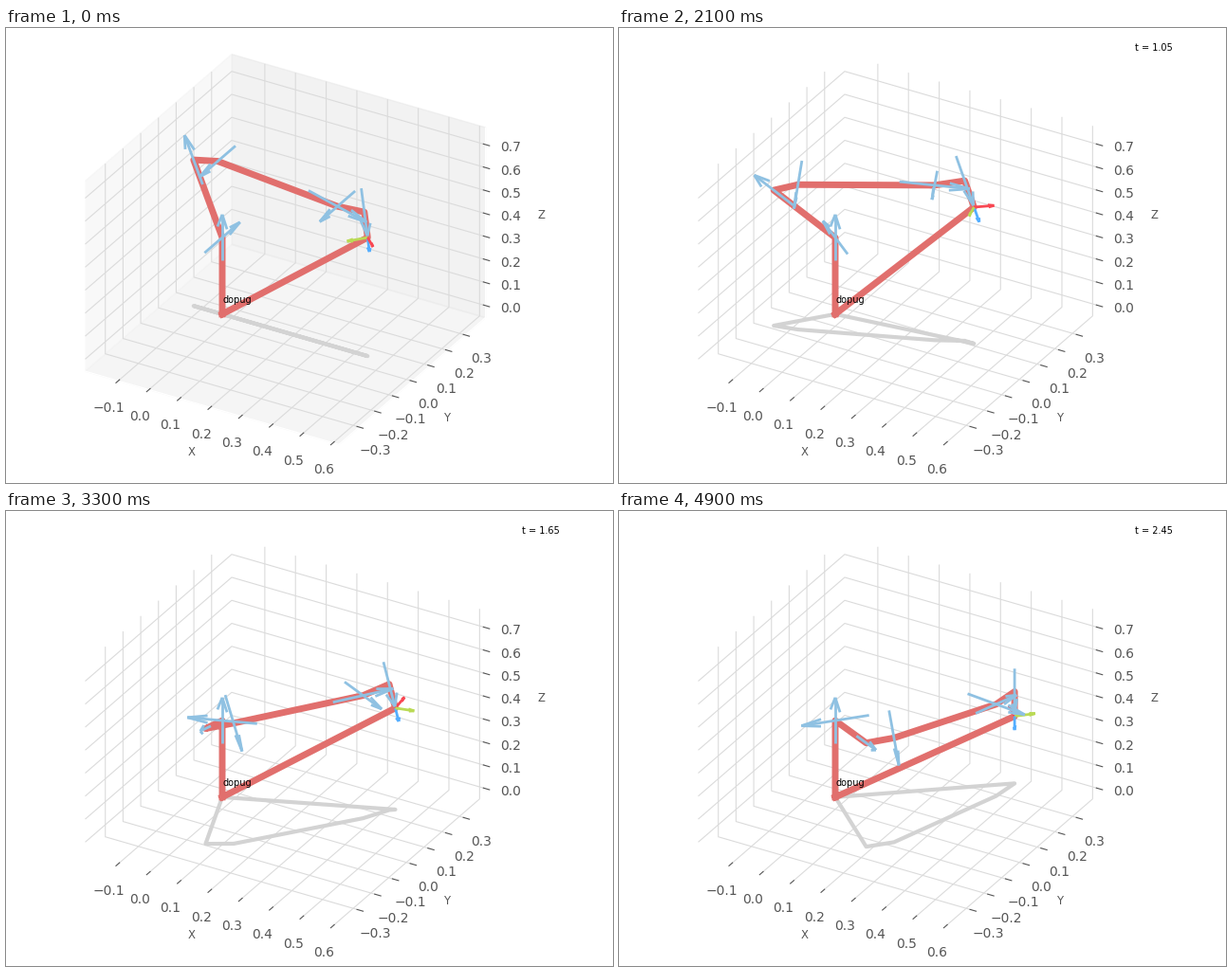
These frames come from a looping animation (640x480 px, 5 s). A matplotlib script:

```python
import numpy as np
import matplotlib.pyplot as plt
from matplotlib.animation import FuncAnimation

FRAMES, INTERVAL, STEP = 50, 100, 0.05
ROBOT_NAME = "dopug"

ROBOT = dict(color="#E16F6D", linewidth=5)
SHADOW = dict(color="lightgrey", linewidth=3)
JOINT_AXIS = dict(color="#8FC1E2", linewidth=2)
EE_COLORS = ("#F84752", "#BADA55", "#54AEFF")
JOINT_LENGTH, EE_LENGTH = 0.2, 0.06

# Modified DH rows (a, alpha, d); the last one is the fixed flange.
H = np.pi / 2
LINKS = [(0, 0, 0.333), (0, -H, 0), (0, H, 0.316), (0.0825, H, 0),
         (-0.0825, -H, 0.384), (0, H, 0), (0.088, H, 0), (0, 0, 0.107)]

Q_START = np.array([0, -0.3, 0, -2.2, 0, 2.0, np.pi / 4])
Q_END = np.array([2.397, -1.188, -1.541, -2.235, -1.247, 1.781, -0.894])

plt.rcParams.update({
    "font.family": "DejaVu Sans",
    "font.size": 7,
    "axes.labelsize": 8.4,
    "axes.labelcolor": "#555555",
    "axes.edgecolor": "white",
    "axes.linewidth": 1,
    "xtick.color": "#555555",
    "ytick.color": "#555555",
    "xtick.labelsize": 10,
    "ytick.labelsize": 10,
    "grid.color": "#dbdbdb",
    "grid.linestyle": "-",
})


def link_transform(a, alpha, d, q):
    ca, sa, cq, sq = np.cos(alpha), np.sin(alpha), np.cos(q), np.sin(q)
    return np.array([[cq, -sq, 0, a],
                     [sq * ca, cq * ca, -sa, -sa * d],
                     [sq * sa, cq * sa, ca, ca * d],
                     [0, 0, 0, 1]])


def forward_kinematics(q):
    pose, poses = np.eye(4), []
    for link, angle in zip(LINKS, [*q, 0]):
        pose = pose @ link_transform(*link, angle)
        poses.append(pose)
    return poses


def joint_angles(u):
    """Quintic blend with zero end velocity and acceleration."""
    s = 10 * u**3 - 15 * u**4 + 6 * u**5
    return Q_START + s * (Q_END - Q_START)


fig = plt.figure(figsize=(6.4, 4.8), dpi=100, facecolor="white")
fig.subplots_adjust(left=-0.09, bottom=0, top=1, right=0.99)
ax = fig.add_subplot(111, projection="3d", proj_type="ortho")
ax.set_facecolor("white")
ax.view_init(elev=30, azim=-60)

SPAN = 0.82683
ax.set_xlim(0.2055 - SPAN / 2, 0.2055 + SPAN / 2)
ax.set_ylim(-SPAN / 2, SPAN / 2)
ax.set_zlim(-0.0526, SPAN - 0.0526)
ax.set_xticks(np.arange(-1, 7) / 10)
ax.set_yticks(np.arange(-3, 4) / 10)
ax.set_zticks(np.arange(0, 8) / 10)
ax.set(xlabel="X", ylabel="Y", zlabel="Z")
ax.grid(True)

shadow, = ax.plot([], [], [], **SHADOW)
arm, = ax.plot([], [], [], **ROBOT)
ax.text(0, 0, 0.05, ROBOT_NAME, color="black")
timer = fig.text(0.85, 0.95, "", color="black")
arrows = []


def add_arrow(start, vector, **style):
    arrows.append(ax.quiver(*start, *vector, **style))


def draw(frame):
    poses = forward_kinematics(joint_angles(frame / (FRAMES - 1)))

    # The arm is drawn as a closed chain through the base.
    base = np.zeros(3)
    x, y, z = np.array([base, *(p[:3, 3] for p in poses), base]).T
    arm.set_data_3d(x, y, z)
    shadow.set_data_3d(x, y, np.zeros_like(z))

    while arrows:
        arrows.pop().remove()
    for pose in poses[:-1]:
        axis = JOINT_LENGTH * pose[:3, 2]
        add_arrow(pose[:3, 3] - axis / 2, axis, **JOINT_AXIS)
    tip = poses[-1]
    for i, color in enumerate(EE_COLORS):
        add_arrow(tip[:3, 3], EE_LENGTH * tip[:3, i], color=color, linewidth=2)

    # Wall panes and the empty clock belong to the opening picture only.
    for axis in (ax.xaxis, ax.yaxis, ax.zaxis):
        axis.pane.set_visible(frame == 0)
    timer.set_text(f"t = {frame * STEP:.2f}" if frame else "")


anim = FuncAnimation(fig, draw, frames=FRAMES, init_func=lambda: None,
                     interval=INTERVAL, repeat=True, repeat_delay=0, blit=False)
plt.show()
```
